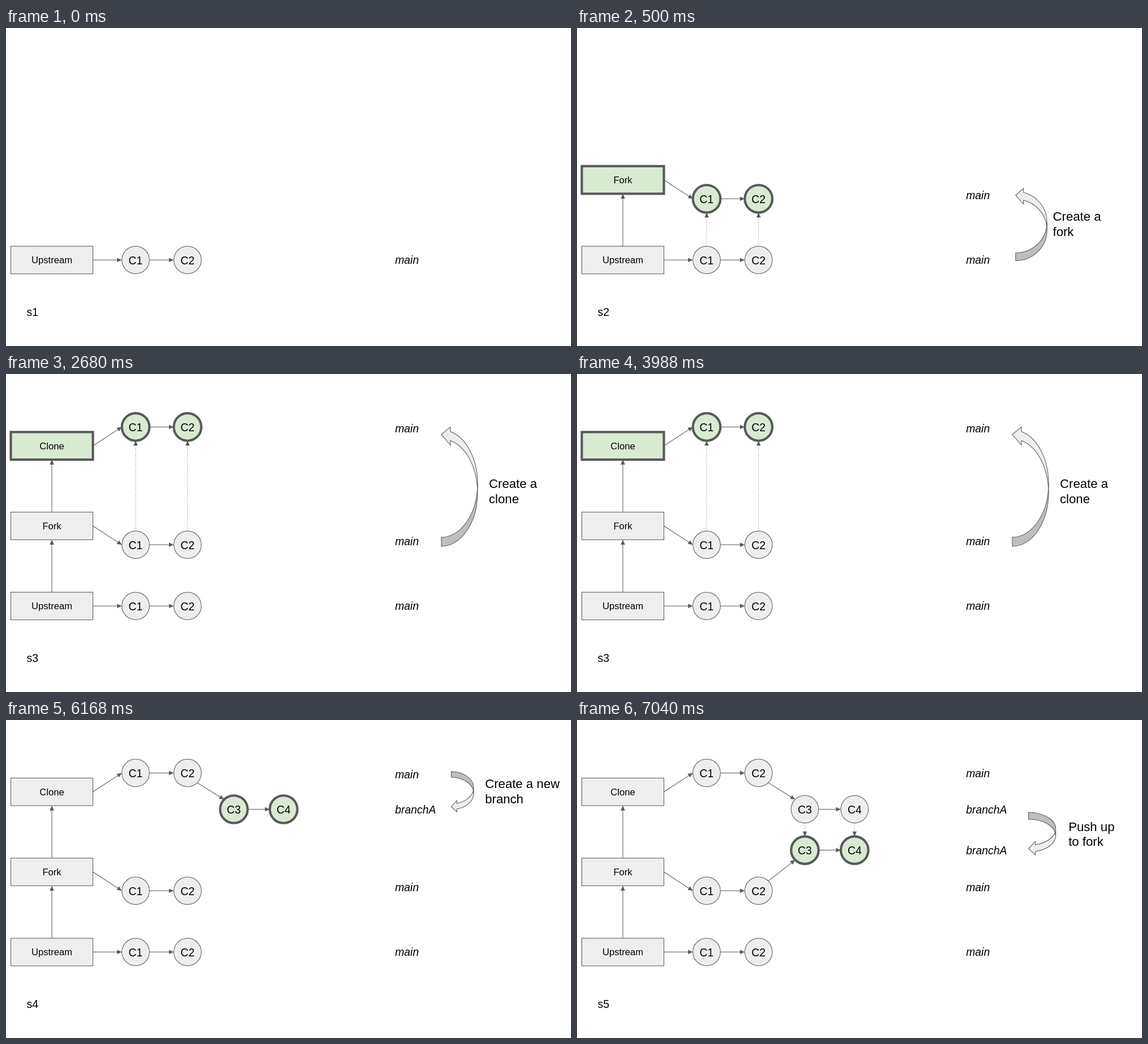
Recreate the animation shown at these times as an HTML page. Size 998 by 561 pixels, loop 8000 ms.

```html
<!DOCTYPE html>
<html lang="en">
<head>
<meta charset="utf-8">
<title>Fork, clone, branch, push</title>
<style>
  html, body { margin: 0; width: 100%; height: 100%; overflow: hidden; background: #fff; }
  svg { display: block; width: 998px; height: 561px; font-family: "Liberation Sans", Arial, sans-serif; }
  .shape, .line { stroke: #595959; stroke-width: 1.04; }
  .shape { fill: #eee; }
  .new { fill: #d9ead3; stroke-width: 4.15; }
  .line { fill: none; }
  .dots { stroke-dasharray: 1.04 3.12; }
  .head { fill: #595959; }
  .shade { fill: #bebebe; }
  text { fill: #000; font-size: 19.39px; }
  .mid { text-anchor: middle; }
  .box { font-size: 16.62px; }
  .ref { font-style: italic; }
  .note { font-size: 22.16px; }
</style>
</head>
<body>
<svg id="stage" viewBox="0 0 998 561"></svg>
<script>
const LOOP = 8000;
const STARTS = [0, 500, 2680, 4860, 7040];
const R = 24.3;
const COL = { C1: 229, C2: 320.7, C3: 402.5, C4: 490.3 };
const ROW = { clone: 93.4, cloneBranch: 157.5, forkBranch: 229.6, fork: 301.3, up: 409.3 };
const BOX = { x: 8.5, w: 145, h: 48.7, Clone: 102.4, Fork: 243.7, Upstream: 385 };
const boxRight = BOX.x + BOX.w, boxMid = BOX.x + BOX.w / 2;

const text = (x, y, s, cls) => `<text x="${x}" y="${y}" class="${cls}">${s}</text>`;
const ref = (y, s = 'main') => text(687.2, y, s, 'ref');
const note = (x, y, ...lines) => lines.map((s, i) => text(x, y + i * 26.7, s, 'note')).join('');

function box(name, fresh) {
  const y = BOX[name];
  return `<rect class="shape ${fresh ? 'new' : ''}" x="${BOX.x}" y="${y}" width="${BOX.w}" height="${BOX.h}"/>` +
    text(boxMid, y + 30.3, name, 'mid box');
}

function commit(name, row, fresh) {
  const x = COL[name], y = ROW[row];
  return `<circle class="shape ${fresh ? 'new' : ''}" cx="${x}" cy="${y}" r="${R}"/>` +
    text(x, y + 7.2, name, 'mid');
}

function arrow(x1, y1, x2, y2, dots) {
  const a = Math.atan2(y2 - y1, x2 - x1), len = 8.6;
  const bx = x2 - len * Math.cos(a), by = y2 - len * Math.sin(a);
  return `<path class="line ${dots ? 'dots' : ''}" d="M${x1} ${y1}L${bx} ${by}"/>` +
    `<path class="head" transform="translate(${x2} ${y2}) rotate(${a * 180 / Math.PI})" d="M0 0L${-len} -3.8V3.8Z"/>`;
}

// Two commits in one row, joined by an arrow
function pair(a, b, row, fresh) {
  const y = ROW[row];
  return commit(a, row, fresh) + commit(b, row, fresh) + arrow(COL[a] + R, y, COL[b] - R, y);
}

const mains = (row, fresh) => pair('C1', 'C2', row, fresh);
const fromBox = (name, row) => arrow(boxRight, BOX[name] + BOX.h / 2, COL.C1 - R, ROW[row]);
const between = (low, high) => arrow(boxMid, BOX[low], boxMid, BOX[high] + BOX.h);

function branchOff(from, to) {
  const d = R * Math.SQRT1_2, s = Math.sign(ROW[to] - ROW[from]);
  return arrow(COL.C2 + d, ROW[from] + s * d, COL.C3 - d, ROW[to] - s * d);
}

function copies(names, from, to) {
  const s = Math.sign(ROW[to] - ROW[from]) * R;
  return names.map(n => arrow(COL[n], ROW[from] + s, COL[n], ROW[to] - s, true)).join('');
}

// Ribbon-like curved arrow; its tail is at the top unless flipped
function swoop(x, y, w, h, flip) {
  const th = w / 4, aw = w / 2, ah = w / 4;
  const ry = h / 2 - (th + aw) / 4, y3 = ry + th;
  const dy = ry * Math.sqrt(1 - (ah / w) ** 2), dh = (aw - th) / 2;
  const ix = w * Math.sqrt(1 - (th / 2 / ry) ** 2), iy = (ry + y3) / 2;
  const arc = (sweep, px, py) => `A${w} ${ry} 0 0 ${sweep} ${px} ${py}`;
  const head = `M${ix} ${iy}` + arc(1, ah, ry + dy) + `V${ry + dy - dh}L0 ${h - aw / 2}L${ah} ${y3 + dy + dh}V${y3 + dy}`;
  const tail = `M${w} ${y3}` + arc(0, 0, th) + 'V0' + arc(1, w, ry) + 'Z';
  const place = flip ? `translate(${x} ${y + h}) scale(1 -1)` : `translate(${x} ${y})`;
  return `<g transform="${place}"><path class="shape" d="${head}${arc(0, w, y3)}L${ix} ${iy}" stroke="none"/>` +
    `<path class="shape shade" d="${tail}"/></g>`;
}

const upstream = () => box('Upstream') + mains('up') + fromBox('Upstream', 'up') + ref(416.3);
const fork = fresh => box('Fork', fresh) + mains('fork', fresh) + fromBox('Fork', 'fork') +
  between('Upstream', 'Fork') + ref(302.3);
const clone = (fresh, refY) => box('Clone', fresh) + mains('clone', fresh) + fromBox('Clone', 'clone') +
  between('Fork', 'Clone') + ref(refY);
const branch = fresh => pair('C3', 'C4', 'cloneBranch', fresh) +
  branchOff('clone', 'cloneBranch') + ref(164.8, 'branchA');

const scenes = [
  () => upstream(),
  () => upstream() + fork(true) + copies(['C1', 'C2'], 'up', 'fork') +
    swoop(774.8, 281.3, 55.4, 129.2, true) + note(840.5, 340.4, 'Create a', 'fork'),
  () => upstream() + fork() + clone(true, 103.3) + copies(['C1', 'C2'], 'fork', 'clone') +
    swoop(769, 90.5, 64, 213.5, true) + note(853, 201.4, 'Create a', 'clone'),
  () => upstream() + fork() + clone(false, 103.3) + branch(true) +
    swoop(786.5, 91, 39.6, 71.9) + note(846.2, 120.2, 'Create a new', 'branch'),
  () => upstream() + fork() + clone(false, 100.6) + branch() +
    pair('C3', 'C4', 'forkBranch', true) + branchOff('fork', 'forkBranch') +
    copies(['C3', 'C4'], 'cloneBranch', 'forkBranch') + ref(236.6, 'branchA') +
    swoop(797.6, 163, 48, 76) + note(868.2, 195.6, 'Push up', 'to fork')
];

const stage = document.getElementById('stage');
const origin = performance.now();
let shown = -1;

function draw(now) {
  const t = Math.max(0, now - origin) % LOOP;
  const i = STARTS.filter(s => s <= t).length - 1;
  if (i !== shown) {
    shown = i;
    stage.innerHTML = scenes[i]() + text(36.5, 507.6, 's' + (i + 1), '');
  }
  requestAnimationFrame(draw);
}
draw(origin);
</script>
</body>
</html>
```
